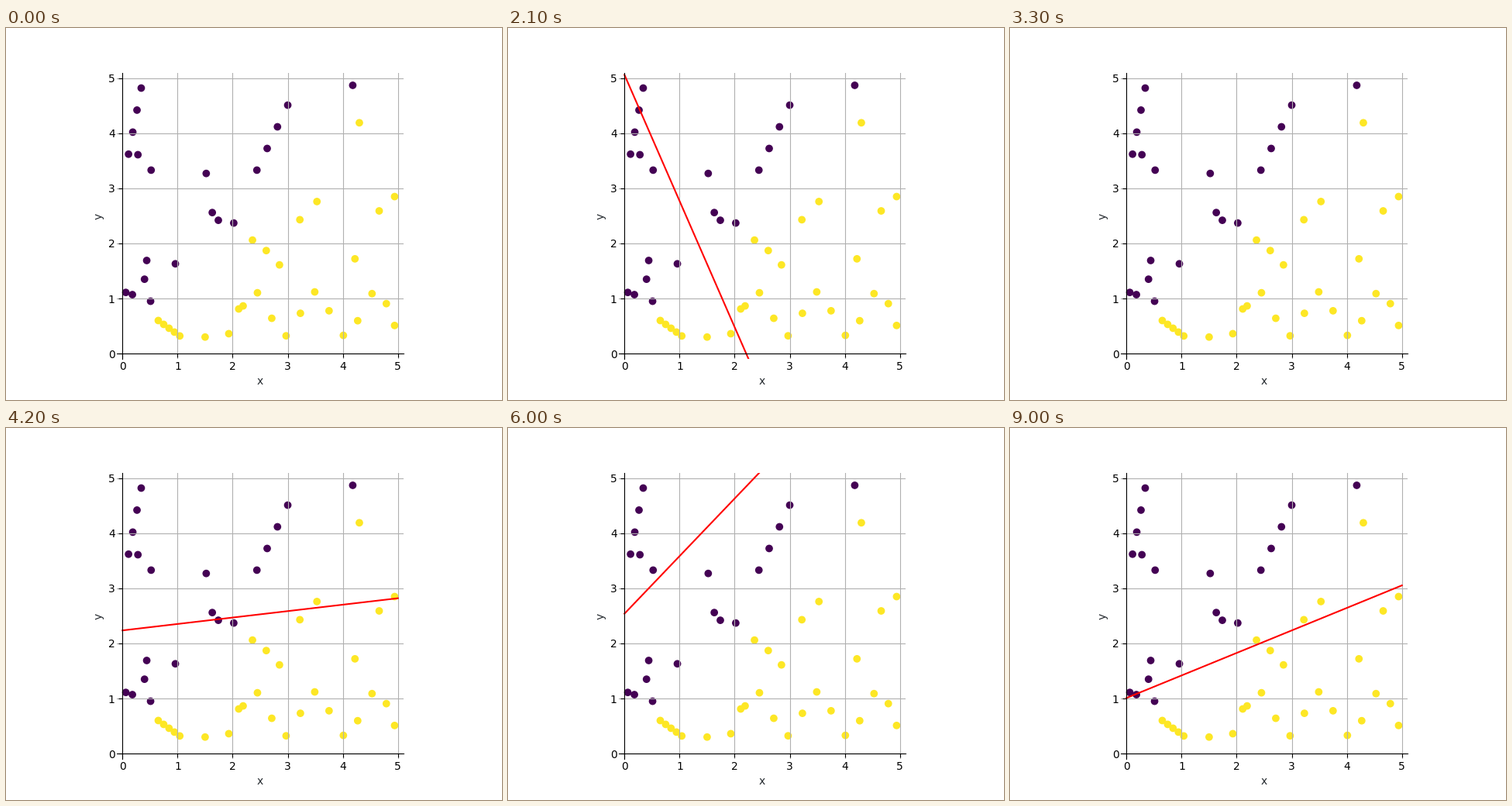
Animation of 640x480 px, one loop 10 s. Source, as a matplotlib script:

```python
import matplotlib.pyplot as plt
import numpy as np
from matplotlib.animation import FuncAnimation

FRAMES, INTERVAL = 100, 100
X_RANGE = np.array([0, 5])
LABEL_COLOR = "#24292e"

# Samples the perceptron gets wrong, by first visit, then easy ones.
SAMPLES = np.array([
    (.52, 3.33), (1.52, 3.27), (2.02, 2.37), (.96, 1.63), (2.11, .81),
    (4.94, .51), (.18, 1.07), (.51, .95), (2.36, 2.06), (4.94, 2.85),
    (.40, 1.35), (4.30, 4.19), (.44, 1.69), (.06, 1.11),
    (.28, 3.61), (1.63, 2.56), (1.74, 2.42), (4.18, 4.87), (1.50, .30),
    (2.61, 1.87), (2.85, 1.61), (3.22, 2.43), (3.53, 2.76),
    (4.22, 1.72), (4.66, 2.59),
])
# Step at which each mistake is corrected: index of the sample.
MISTAKES = {
    18: 0, 19: 1, 20: 2, 21: 3, 22: 4, 23: 0, 25: 5, 26: 6, 29: 7, 30: 8,
    33: 9, 34: 0, 42: 2, 43: 10, 48: 9, 53: 1, 58: 11, 60: 7, 68: 12,
    69: 7, 72: 3, 88: 13, 90: 6,
}
START_WEIGHTS = np.array([25.1, -4.53, 6.43])


def line_of_dots(start, end, count):
    return np.linspace(start, end, count)


def wave_of_dots(left, right, count):
    x = np.linspace(left, right, count)
    return np.column_stack([x, .72 + .4 * np.cos(2 * np.pi * (x - 2.4) / 1.1)])


def is_below(points):
    return points[:, 0] > points[:, 1]


def train():
    """Weights (bias, x, y) after every step."""
    weights = np.tile(START_WEIGHTS, (FRAMES, 1))
    signs = np.where(is_below(SAMPLES), 1, -1)
    for step, i in MISTAKES.items():
        weights[step:] += signs[i] * np.array([1, *SAMPLES[i]])
    return weights


points = np.vstack([
    SAMPLES,
    line_of_dots((.11, 3.62), (.34, 4.82), 4),
    line_of_dots((2.44, 3.33), (3.00, 4.51), 4),
    line_of_dots((.65, .60), (1.04, .32), 5),
    wave_of_dots(1.93, 4.79, 12),
])
weights = train()

fig, ax = plt.subplots(figsize=(6.4, 4.8), dpi=100)
ax.scatter(*points.T, c=is_below(points).astype(int), cmap="viridis")
boundary, = ax.plot([], [], "r")

ax.set_aspect("equal")
ax.set(xlim=(-.1, 5.1), ylim=(-.1, 5.1), xticks=range(6), yticks=range(6))
ax.set_xlabel("x", color=LABEL_COLOR)
ax.set_ylabel("y", color=LABEL_COLOR)
ax.grid(True)
for side in ("left", "bottom"):
    ax.spines[side].set_position("zero")
for side in ("right", "top"):
    ax.spines[side].set_visible(False)


def draw(frame):
    bias, wx, wy = weights[frame]
    boundary.set_data(X_RANGE, -(bias + wx * X_RANGE) / wy)
    return boundary,


anim = FuncAnimation(fig, draw, frames=FRAMES, interval=INTERVAL,
                     init_func=lambda: draw(0), repeat=True, repeat_delay=0)
plt.show()
```
